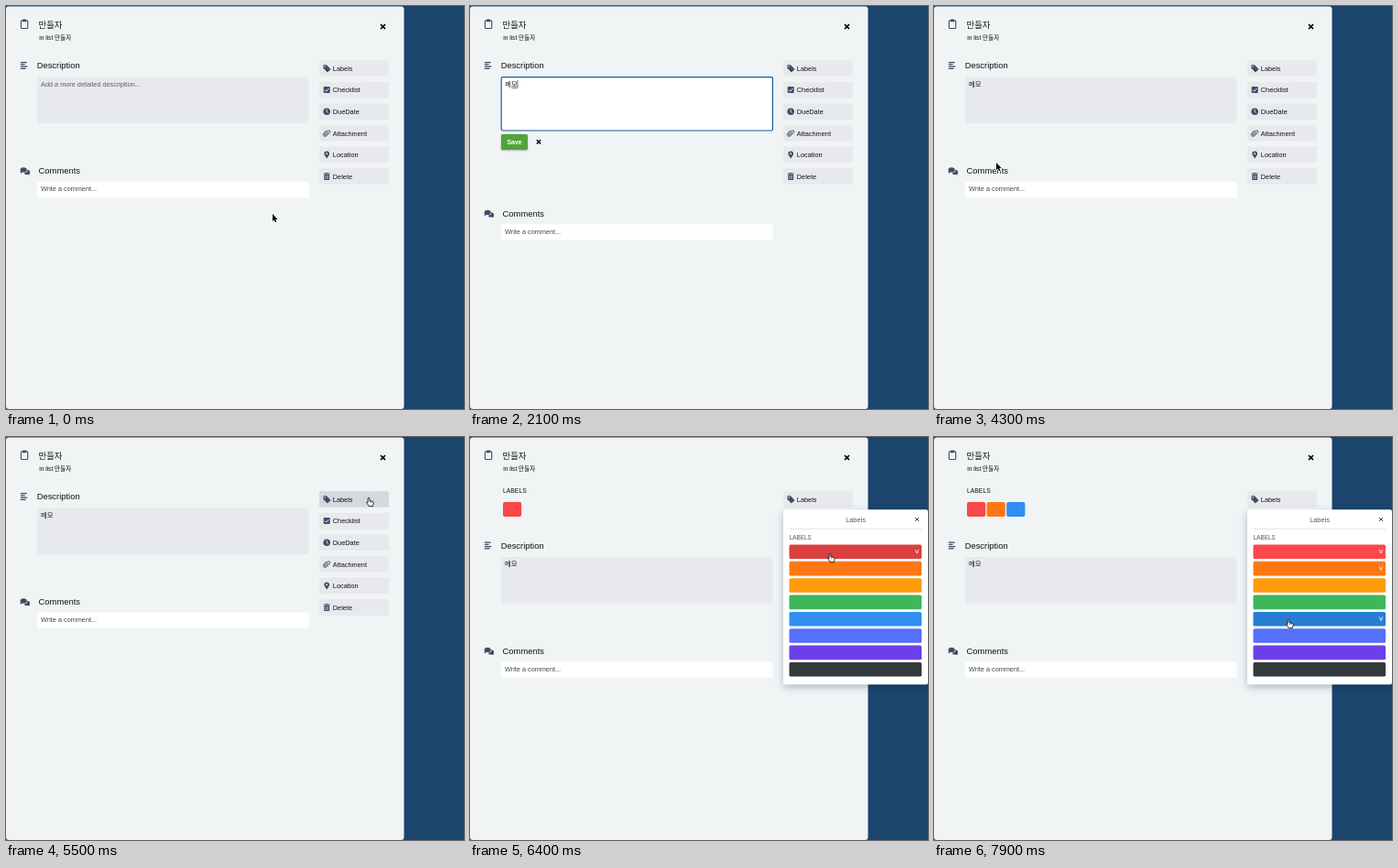
An HTML page with a canvas that plays this animation: 500x440 px, repeating every 8000 ms.

```html
<!DOCTYPE html>
<html lang="ko">
<head>
<meta charset="utf-8">
<title>Card editor</title>
<style>
html, body { margin: 0; width: 100%; height: 100%; overflow: hidden; background: #1b456c; }
canvas { display: block; width: 500px; height: 440px; }
</style>
</head>
<body>
<canvas id="stage"></canvas>
<script>
const canvas = document.getElementById('stage');
const ctx = canvas.getContext('2d');
const ratio = window.devicePixelRatio || 1;
canvas.width = 500 * ratio;
canvas.height = 440 * ratio;

const LOOP = 8000, STEP = 100;
const FONT = '"Liberation Sans", "Noto Sans CJK KR", "Noto Sans CJK", sans-serif';
const INK = '#101214', ICON = '#424b66', PANEL = '#f0f4f5', FIELD = '#e8e9ed';

// Moments of the story, in ms
const EDIT = 800, SAVE = 3600, POPUP = 5700;
const typed = [[1000, 'ㅁ'], [1100, '메'], [1300, '메ㅁ'], [1400, '메모']];
const picks = [[6300, 0], [7100, 1], [7600, 4]];

const colors = ['#fb484a', '#ff7714', '#ff9c0a', '#40b65c', '#2f8ef0', '#5570fa', '#6c40e8', '#333a3d'];
const hovers = ['#d9403f', '#de6812', '#de8808', '#389f50', '#287ed3', '#4a62da', '#5e38ca', '#2c3235'];

// Pointer stops: time, x, y
const stops = [
  [0, 291, 227], [200, 291, 227], [700, 112, 106], [2500, 112, 106],
  [3100, 65, 152], [3400, 53, 150], [3700, 53, 150], [4200, 68, 171],
  [4500, 68, 171], [5400, 396, 66], [5800, 396, 66], [6200, 393, 127],
  [6600, 393, 127], [7000, 390, 145], [7200, 390, 145], [7500, 387, 199], [8000, 387, 199]
];

const arrow = new Path2D('M0 0V8L1.8 6.4 3 9.2 4.4 8.6 3.2 5.9H5.6Z');
const hand = new Path2D('M-.9.9q.9-1.6 1.8 0v2.6l3.3.9q1.2.4 1 1.6l-.6 2.4v1.2h-4.4q-.4-1.4-2.6-3.6q0-1.3 1.5-.4z');

function box(x, y, w, h, fill, r = 1.5) {
  ctx.beginPath();
  ctx.roundRect(x, y, w, h, r);
  ctx.fillStyle = fill;
  ctx.fill();
}

function text(str, x, y, size, fill = INK, weight = 'normal') {
  ctx.font = `${weight} ${size}px ${FONT}`;
  ctx.fillStyle = fill;
  ctx.fillText(str, x, y);
}

function line(points, color, width) {
  ctx.beginPath();
  points.forEach(([x, y], i) => i ? ctx.lineTo(x, y) : ctx.moveTo(x, y));
  ctx.strokeStyle = color;
  ctx.lineWidth = width;
  ctx.stroke();
}

function cross(x, y, r, width, color = '#000') {
  line([[x - r, y - r], [x + r, y + r]], color, width);
  line([[x - r, y + r], [x + r, y - r]], color, width);
}

function disc(x, y, rx, ry, fill) {
  ctx.beginPath();
  ctx.ellipse(x, y, rx, ry, 0, 0, Math.PI * 2);
  ctx.fillStyle = fill;
  ctx.fill();
}

function at(x, y, draw) {
  ctx.save();
  ctx.translate(x, y);
  draw();
  ctx.restore();
}

function shadow(color, blur, dy, draw) {
  ctx.save();
  ctx.shadowColor = color;
  ctx.shadowBlur = blur * ratio;
  ctx.shadowOffsetY = dy * ratio;
  draw();
  ctx.restore();
}

function fillPath(d, color = ICON) {
  ctx.fillStyle = color;
  ctx.fill(new Path2D(d));
}

// Icons are drawn around their own centre
const buttons = [
  ['Labels', () => {
    fillPath('M-3.8-3.2q0-.6.6-.6h2.9l4.2 4.2q.5.5 0 1L1.2 4q-.5.5-1 0L-3.8 0z');
    disc(-2.1, -2.1, .75, .75, FIELD);
  }],
  ['Checklist', () => {
    box(-3.5, -3.5, 7, 7, ICON, 1);
    line([[-2, .1], [-.6, 1.5], [2.1, -1.4]], '#fff', 1);
  }],
  ['DueDate', () => {
    disc(0, 0, 3.8, 3.8, ICON);
    line([[0, -2.3], [0, .3], [1.4, 1.3]], '#fff', .8);
  }],
  ['Attachment', () => {
    ctx.strokeStyle = ICON;
    ctx.lineWidth = 1;
    ctx.stroke(new Path2D('M1.6-.8L-1 1.9q-.8.6-1.2 0t.2-1.2L1-2.5q1.2-1 2.1-.2t0 2.2L-.4 2.9q-1.6 1.3-2.8.1t-.1-2.8L-.2-3'));
  }],
  ['Location', () => {
    fillPath('M0 4Q-2.9.3-2.9-1.1A2.9 2.9 0 0 1 2.9-1.1Q2.9.3 0 4z');
    disc(0, -1.1, 1, 1, FIELD);
  }],
  ['Delete', () => {
    box(-3.5, -3.4, 7, 1, ICON, .3);
    box(-1.2, -4.1, 2.4, 1, ICON, .3);
    box(-3, -1.9, 6, 5.9, ICON, .7);
    for (const x of [-1.4, 0, 1.4]) line([[x, -1], [x, 3]], FIELD, .5);
  }]
];

function pointerAt(t) {
  const i = stops.findIndex((s, k) => k && t < s[0]);
  const [t0, x0, y0] = stops[i - 1], [t1, x1, y1] = stops[i];
  const u = (t - t0) / (t1 - t0), e = u * u * (3 - 2 * u);
  return [x0 + (x1 - x0) * e, y0 + (y1 - y0) * e];
}

const inside = ([px, py], x, y, w, h) => px >= x && px < x + w && py >= y && py < y + h;

function drawHeader() {
  ctx.strokeStyle = ICON;
  ctx.lineWidth = 1.1;
  ctx.beginPath();
  ctx.roundRect(16.4, 15.9, 7.4, 8.6, 1);
  ctx.stroke();
  box(18, 14.6, 4.2, 2.7, ICON, .8);
  text('만들자', 35.5, 23.7, 9.4);
  text('in list 만들자', 36.2, 37.3, 6.6);
  cross(411.5, 22.5, 2.5, 1.7);
}

function drawDescription(t, dy, editing, memo) {
  [7, 4.8, 7.5, 5.8].forEach((w, i) => box(15.8, 61 + dy + i * 2.25, w, 1.2, ICON, .3));
  text('Description', 33.7, 68 + dy, 9.4);
  if (!editing) {
    box(34, 77.6 + dy, 296.5, 50.4, FIELD);
    if (memo) text(memo, 38, 87.7 + dy, 7.3);
    else text('Add a more detailed description...', 38, 87.7 + dy, 7.32, '#5c5f66');
    return;
  }
  box(33.6, 77, 297.4, 59.6, '#0f5aa3', 2);
  box(34.8, 78.2, 295, 57.2, '#fff', 1);
  text(memo, 38.3, 87.7, 7.3);
  const end = 38.3 + memo.length * 6.72;
  if (memo) line([[end - 6.4, 89.3], [end, 89.3]], INK, .7);
  if (Math.floor((t - 880 + 1100) / 550) % 2 === 0) line([[end + .3, 81], [end + .3, 89.3]], INK, .6);
  shadow('rgba(0,0,0,.3)', 2, .8, () => box(34, 140, 29, 17, '#51a33d'));
  text('Save', 40.4, 150.9, 7, '#fff', 'bold');
  cross(75, 148.3, 2.1, 1.4);
}

function drawComments(dy) {
  at(0, dy, () => {
    disc(22.9, 181.4, 3.2, 2.6, ICON);
    fillPath('M23 183.6l3 .8-1-2.4z');
    disc(19.3, 179, 4.1, 3.2, PANEL);
    disc(19.2, 178.9, 3.6, 2.7, ICON);
    fillPath('M16 180l-.4 2.5 3-.9z');
    text('Comments', 35.6, 183, 9.4);
    box(34, 191.8, 296.5, 17.2, '#fff');
    text('Write a comment...', 38, 202.3, 7.3, '#44474d');
  });
}

function drawPopup(mouse, chosen) {
  shadow('rgba(9,30,66,.28)', 8, 3, () => box(342, 79.3, 158, 191, '#fff', 2));
  text('Labels', 410.2, 92.6, 7.35, '#4a5568');
  cross(488, 90, 1.9, .9, '#333');
  line([[348.5, 100.3], [493, 100.3]], '#d4d7dc', .7);
  text('LABELS', 348.8, 111.6, 6.3, '#4c5a72');
  colors.forEach((color, i) => {
    const y = 117.5 + i * 18.35;
    const over = inside(mouse, 348.5, y, 144.5, 15.6);
    box(348.5, y, 144.5, 15.6, over ? hovers[i] : color);
    if (chosen.includes(i)) line([[486.2, y + 5.5], [488, y + 9.5], [489.8, y + 5.5]], '#fff', .8);
  });
}

function drawPointer(mouse, editing, popup) {
  const [x, y] = mouse;
  if (editing && inside(mouse, 34, 77, 296.5, 59.5)) {
    line([[x, y - 4], [x, y + 4]], INK, .7);
    for (const s of [-4, 4]) line([[x - 1.5, y + s], [x + 1.5, y + s]], INK, .7);
    return;
  }
  const clickable = popup && y > 79
    ? inside(mouse, 348.5, 117.5, 144.5, 144)
    : editing
      ? inside(mouse, 34, 140, 29, 17)
      : inside(mouse, 34, 77.6, 296.5, 50.4) || buttons.some((b, i) => inside(mouse, 342, 59 + i * 23.6, 76, 17.6));
  at(x, y, () => {
    ctx.lineJoin = 'round';
    if (clickable) {
      ctx.fillStyle = '#fff';
      ctx.fill(hand);
      ctx.strokeStyle = '#111';
      ctx.lineWidth = .85;
      ctx.stroke(hand);
      for (const k of [1.5, 3]) line([[k, 4.2], [k, 5.8]], '#111', .5);
    } else {
      ctx.strokeStyle = '#fff';
      ctx.lineWidth = 1.4;
      ctx.stroke(arrow);
      ctx.fillStyle = '#000';
      ctx.fill(arrow);
    }
  });
}

function draw(t) {
  const mouse = pointerAt(t);
  const editing = t >= EDIT && t < SAVE;
  const popup = t >= POPUP;
  const memo = typed.filter(([when]) => t >= when).map(k => k[1]).pop() || '';
  const chosen = picks.filter(([when]) => t >= when).map(p => p[1]);
  const dy = chosen.length ? 53.5 : 0;

  ctx.setTransform(ratio, 0, 0, ratio, 0, 0);
  ctx.fillStyle = '#1b456c';
  ctx.fillRect(0, 0, 500, 440);
  box(0, .6, 434.5, 439.4, PANEL, 3);
  drawHeader();

  if (chosen.length) {
    text('LABELS', 36, 60.8, 6.8);
    chosen.forEach((c, i) => box(36 + i * 21.6, 71, 20.2, 16, colors[c], 2));
  }
  drawDescription(t, dy, editing, memo);
  drawComments(editing ? 46.5 : dy);

  buttons.forEach(([name, icon], i) => {
    const y = 59.2 + i * 23.6;
    const over = !(popup && mouse[1] > 79) && inside(mouse, 342, y, 76, 17.6);
    box(342, y, 76, 17.6, over ? '#d5d8df' : FIELD);
    at(350.2, y + 8.8, icon);
    text(name, 356.8, y + 11.5, 7.35);
  });

  if (popup) drawPopup(mouse, chosen);
  // The pointer hides while typing
  if (t < 1000 || t >= 2500) drawPointer(mouse, editing, popup);
}

const start = performance.now();
function tick(now) {
  const t = Math.max(0, now - start) % LOOP;
  draw(Math.floor(t / STEP) * STEP);
  requestAnimationFrame(tick);
}
draw(0);
requestAnimationFrame(tick);
</script>
</body>
</html>
```
